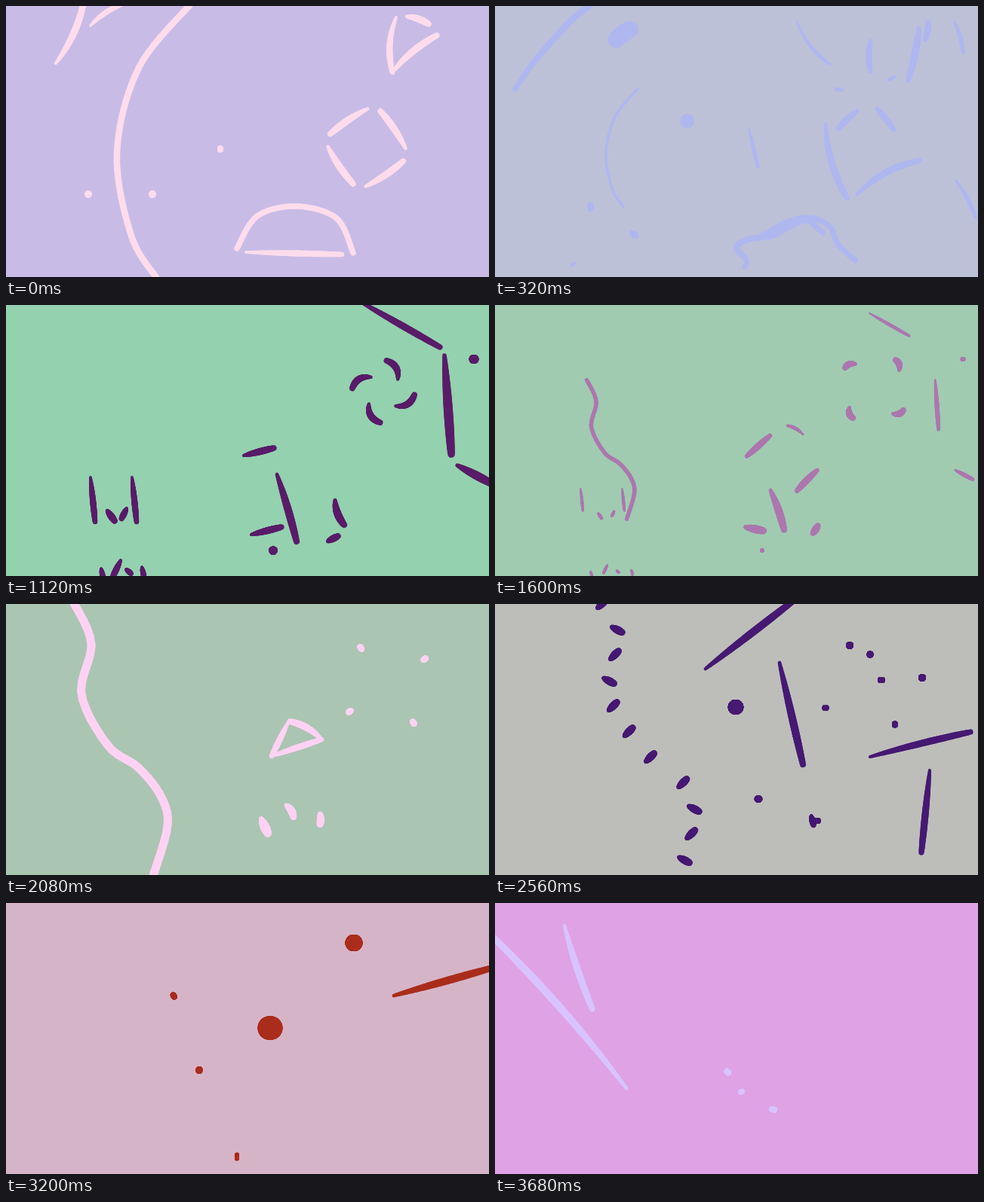
Animation of 640x360 px, one loop 3760 ms. Source, as an HTML page with a canvas:

```html
<!DOCTYPE html>
<html lang="en">
<head>
<meta charset="utf-8">
<title>Drifting strokes</title>
<style>
html, body { margin: 0; width: 100%; height: 100%; overflow: hidden; }
canvas { display: block; width: 640px; height: 360px; }
</style>
</head>
<body>
<canvas id="stage" width="640" height="360"></canvas>
<script>
const ctx = document.getElementById('stage').getContext('2d');
const LOOP = 3760, STEP = 80, N = 40, REACH = 130;
const mix = (a, b, k) => a + (b - a) * k;
const clamp = (v, lo = 0, hi = 1) => Math.max(lo, Math.min(hi, v));
const repeat = (n, make) => Array.from({ length: n }, (_, i) => make(i));
const sample = make => repeat(N + 1, i => make(i / N));

// Brush mark: thin where it starts, fullest past the middle, bowed sideways by bend.
function mark(w, x0, y0, x1, y1, bend = 0) {
  const len = Math.hypot(x1 - x0, y1 - y0);
  return sample(u => {
    const bow = bend * 4 * u * (1 - u) / len;
    return {
      x: mix(x0, x1, u) - bow * (y1 - y0),
      y: mix(y0, y1, u) + bow * (x1 - x0),
      w: w * (.45 + 1.85 * u - 1.5 * u * u)
    };
  });
}

// Even line through a few points (Catmull-Rom).
function path(w, ...xy) {
  const last = xy.length / 2 - 1;
  return sample(u => {
    const i = Math.min(last - 1, Math.floor(u * last)), f = u * last - i;
    const axis = d => {
      const [q, r, s, t] = [-1, 0, 1, 2].map(o => xy[2 * clamp(i + o, 0, last) + d]);
      return r + f / 2 * (s - q + f * (2 * q - 5 * r + 4 * s - t + f * (3 * (r - s) + t - q)));
    };
    return { x: axis(0), y: axis(1), w };
  });
}

function dot(x, y, w, h = w) {
  const d = Math.min(w, h);
  return sample(u => ({ x: x + (u - .5) * (w - d), y: y + (u - .5) * (h - d), w: d }));
}

function dash(w, x, y, len, deg, bend) {
  const a = deg * Math.PI / 180, dx = len / 2 * Math.cos(a), dy = len / 2 * Math.sin(a);
  return mark(w, x - dx, y - dy, x + dx, y + dy, bend);
}

// Dashes spread evenly round a centre; turn 0 points them outwards.
const ring = (n, w, x, y, r, phase, len, turn = 0, bend = 0) => repeat(n, i => {
  const deg = phase + 360 * i / n, a = deg * Math.PI / 180;
  return dash(w, x + r * Math.cos(a), y + r * Math.sin(a), len, deg + turn, bend);
});

const twice = (w, x, y, lx, ly, dx, dy) =>
  repeat(2, i => mark(w, x + i * dx, y + i * dy, x + i * dx + lx, y + i * dy + ly));

const river = path(11, 88, -5, 113, 52, 100, 120, 135, 188, 175, 217, 205, 255, 214, 295, 194, 364);

// The river broken into dashes, leaning to and fro alike from both ends.
const crumbs = repeat(11, i => {
  const y = 34 * i, d = Math.min(i, 11 - i);
  const x = river.find(p => p.y >= y).x + 50;
  return dash(10, x, y, 16, d % 2 && d < 5 ? 28 : -45);
});

const scenes = [
  { at: 0, bg: [200, 188, 231], ink: [255, 220, 235], strokes: [
    mark(9, 66, 76, 103, -5, 5),
    mark(7, 112, 26, 155, -3, -3),
    path(8.5, 246, -4, 176, 82, 147, 195, 166, 305, 200, 362),
    dot(109, 250, 9), dot(194, 250, 9, 10), dot(284, 190, 8, 9),
    mark(8, 517, 15, 512, 88, 6),
    mark(9, 512, 88, 571, 39, -4),
    mark(9, 531, 14, 560, 24, -2),
    ...ring(4, 9, 478, 188, 42, 56, 60, -90, 2),
    path(7.5, 306, 322, 333, 279, 385, 266, 438, 282, 460, 328),
    mark(8, 318, 327, 445, 330)
  ] },
  { at: 560, bg: [179, 197, 205], ink: [143, 168, 240], strokes: [
    path(8, 150, -4, 110, 15, 70, 48, 25, 95, -3, 137),
    dot(197, 58, 35, 37), dot(233, 125, 26, 25),
    mark(9, 332, 144, 353, 233),
    mark(8, 387, -4, 463, 96, 10),
    mark(9, 447, 134, 471, 269, 10),
    mark(9, 481, 259, 589, 205, -14),
    mark(10, 599, 214, 645, 300, -4),
    ...ring(5, 8, 493, 115, 37, -102, 18),
    mark(10, 555, 22, 574, 107, -6),
    mark(8, 584, 19, 599, 68, -3),
    mark(10, 602, 6, 623, 78, -4),
    ...ring(3, 7, 140, 322, 42, -90, 11),
    path(8, 427, 279, 402, 251, 375, 267, 350, 287, 305, 297, 294, 316, 330, 344, 340, 362),
    path(7, 389, 293, 425, 291, 455, 291, 467, 308, 460, 333, 491, 346)
  ] },
  { at: 1120, bg: [148, 209, 174], ink: [89, 28, 105], strokes: [
    mark(9, 470, -4, 575, 56),
    mark(12, 581, 67, 590, 198),
    mark(11, 598, 213, 645, 238),
    dot(620, 72, 13, 12), dot(354, 326, 11),
    ...ring(4, 9, 500, 115, 31, 22, 29, -53, 6),
    ...twice(9, 315, 200, 40, -10, 10, 105),
    mark(10, 359, 225, 385, 314, -1),
    mark(10, 436, 259, 448, 292, 3),
    mark(9, 426, 314, 440, 307),
    ...twice(8, 112, 229, 6, 59, 55, 0),
    ...twice(7, 126, 350, 3, 14, 54, -2),
    mark(9, 134, 273, 144, 287),
    mark(8, 160, 270, 153, 284),
    mark(8, 152, 339, 141, 362),
    mark(7, 159, 351, 166, 357)
  ] },
  { at: 2080, bg: [171, 197, 179], ink: [255, 210, 243], strokes: [
    river,
    mark(8, 374, 157, 352, 202),
    mark(8, 352, 202, 418, 180),
    mark(9, 418, 180, 376, 156, 4),
    mark(12, 338, 285, 347, 305),
    mark(10, 371, 267, 381, 283, -2),
    mark(10, 416, 278, 416, 293, -1),
    ...ring(4, 8, 505, 108, 60, 55, 6)
  ] },
  { at: 2560, bg: [189, 190, 185], ink: [70, 25, 115], strokes: [
    ...crumbs,
    mark(10, 279, 86, 395, -4),
    mark(10, 377, 78, 408, 213),
    mark(9, 497, 203, 630, 170, -1),
    mark(9, 576, 221, 565, 330),
    dot(319, 137, 21, 20),
    dot(470, 55, 10), dot(497, 67, 9), dot(512, 101, 10, 8),
    dot(566, 98, 10), dot(438, 138, 9, 8), dot(530, 160, 8, 9),
    dot(349, 259, 11, 9),
    mark(8, 419, 281, 422, 294), dot(426, 288, 12, 8)
  ] },
  { at: 3200, bg: [214, 180, 200], ink: [170, 45, 28], strokes: [
    dot(461, 53, 23, 22), dot(350, 166, 33, 31),
    dash(8, 222, 123, 5, 60), dot(256, 222, 9, 10), dot(306, 337, 6, 11),
    mark(10, 514, 123, 645, 86)
  ] },
  { at: 3680, bg: [223, 163, 229], ink: [216, 195, 255], strokes: [
    mark(10, 174, 246, -4, 44, 5),
    mark(9, 92, 30, 129, 141, 2),
    dash(8, 308, 224, 5, 50), dash(7, 326, 251, 4, -30), dash(8, 368, 274, 6, 15)
  ] }
];

const dist = (p, q) => Math.hypot(p.x - q.x, p.y - q.y);
const span = s => dist(s[0], s[N]);
const gap = (a, b) =>
  a.reduce((sum, p, i) => sum + dist(p, b[i]), 0) / a.length + Math.abs(span(a) - span(b)) / 2;

// A stroke without a partner grows from, or shrinks to, its middle.
const seed = s => s.map(() => ({ ...s[N / 2], w: 0 }));

function pairUp(from, to) {
  const options = [];
  for (const a of from) for (const b of to) {
    const back = [...b].reverse();
    const end = gap(a, b) <= gap(a, back) ? b : back;
    options.push({ a, b, end, d: gap(a, end) });
  }
  const used = new Set(), pairs = [];
  for (const { a, b, end, d } of options.sort((p, q) => p.d - q.d)) {
    if (d > REACH || used.has(a) || used.has(b)) continue;
    used.add(a).add(b);
    pairs.push([a, end]);
  }
  for (const a of from) if (!used.has(a)) pairs.push([a, seed(a)]);
  for (const b of to) if (!used.has(b)) pairs.push([seed(b), b]);
  return pairs;
}

scenes.forEach((s, i) => {
  s.next = scenes[i + 1] || s;
  s.pairs = s.next === s ? s.strokes.map(a => [a, a]) : pairUp(s.strokes, s.next.strokes);
});

const blend = (a, b, k) => `rgb(${a.map((v, i) => Math.round(mix(v, b[i], k)))})`;

function drawStroke(a, b, k) {
  const pts = a.map((p, i) => ({
    x: mix(p.x, b[i].x, k), y: mix(p.y, b[i].y, k), w: mix(p.w, b[i].w, k)
  }));
  for (let i = 0; i < N; i++) {
    const p = pts[i], q = pts[i + 1], w = (p.w + q.w) / 2;
    if (w < .6) continue;
    ctx.lineWidth = w;
    ctx.beginPath();
    ctx.moveTo(p.x, p.y);
    ctx.lineTo(q.x + .001, q.y);
    ctx.stroke();
  }
}

function draw(time) {
  const t = Math.floor(time % LOOP / STEP) * STEP;
  const s = scenes.filter(c => c.at <= t).pop();
  const k = s.next === s ? 0 : (t - s.at) / (s.next.at - s.at);
  ctx.fillStyle = blend(s.bg, s.next.bg, k);
  ctx.fillRect(0, 0, 640, 360);
  ctx.strokeStyle = blend(s.ink, s.next.ink, clamp((k - .5) * 3 + .5));
  ctx.lineCap = 'round';
  for (const [a, b] of s.pairs) drawStroke(a, b, k);
}

function tick() {
  draw(performance.now());
  requestAnimationFrame(tick);
}
tick();
</script>
</body>
</html>
```
